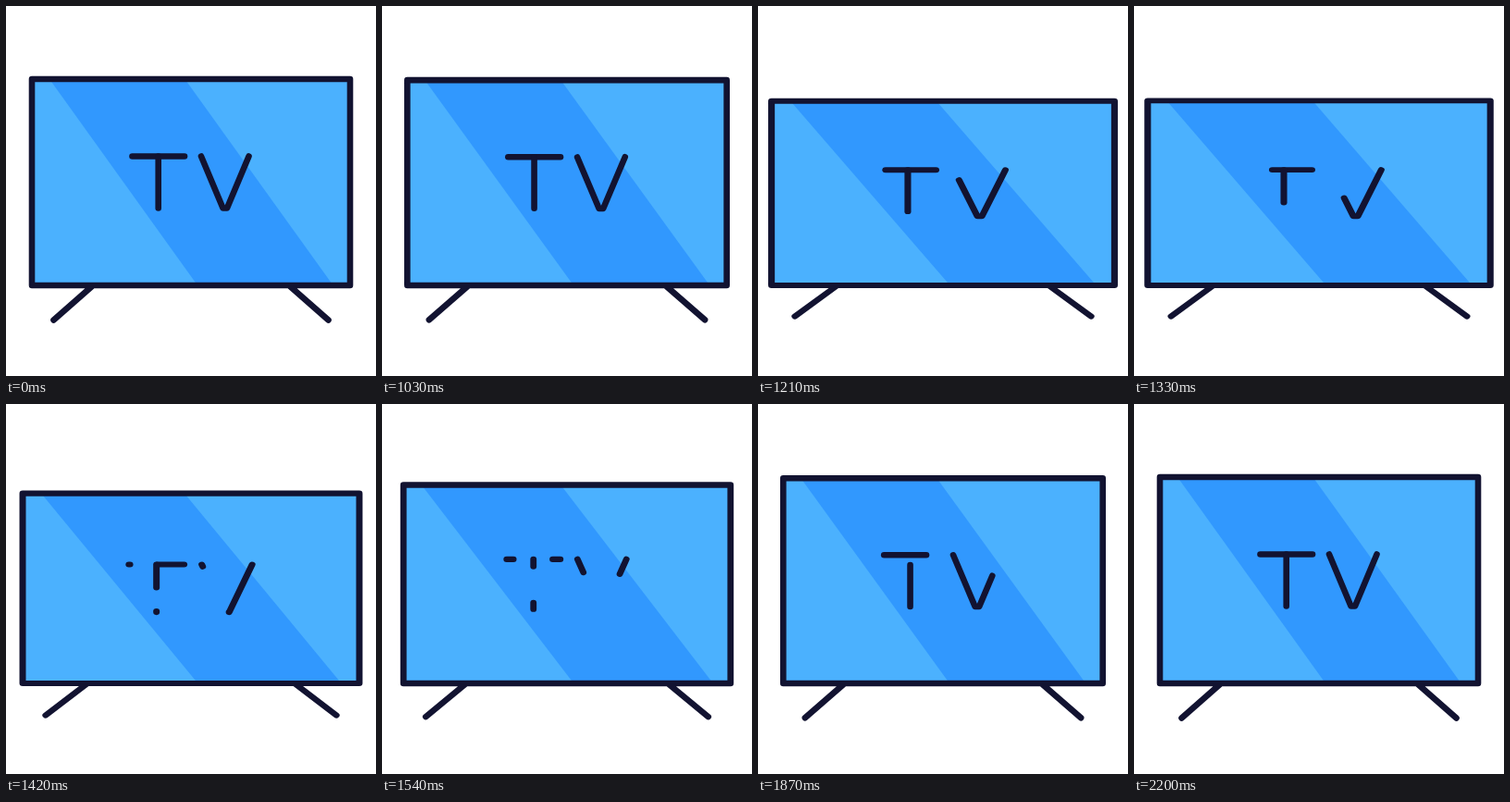
An HTML page for the animation above (2230 ms loop, 400 by 400 pixels).

```html
<!DOCTYPE html>
<html lang="en">
<head>
<meta charset="utf-8">
<title>TV</title>
<style>
  html, body { margin: 0; height: 100%; overflow: hidden; background: #fff; }
  svg { display: block; width: 100%; height: 100%; }
</style>
</head>
<body>
<svg viewBox="0 0 400 400">
  <g id="tv" fill="none" stroke="#121331" stroke-width="6.6" stroke-linecap="round" stroke-linejoin="round">
    <path d="M28 79H372V302H28Z" fill="#4bb1fe" stroke="none"/>
    <path d="M47 79H193.4L353.6 302H207Z" fill="#3198fe" stroke="none"/>
    <path d="M28 79H372V302H28ZM93 303L51.5 339.5M307 303L348.5 339.5"/>
    <g id="letters">
      <path pathLength="1" d="M136.5 162.5H193"/>
      <path pathLength="1" d="M164.7 218.5V162.5"/>
      <path pathLength="1" d="M211 162.5L234.5 218.5H239L262.5 162.5"/>
    </g>
  </g>
</svg>
<script>
const LOOP = 2230, START = 1030, STEP = 30;
const tv = document.getElementById('tv');
const leaving = document.getElementById('letters');
const entering = tv.appendChild(leaving.cloneNode(true));
entering.removeAttribute('id');

// Cubic Bezier easing (x1, 0, x2, 1) between two times
function ease(t, from, to, x1, x2) {
  const x = (t - from) / (to - from);
  if (x <= 0) return 0;
  if (x >= 1) return 1;
  let lo = 0, hi = 1;
  for (let i = 0; i < 24; i++) {
    const u = (lo + hi) / 2, v = 1 - u;
    if (3 * u * v * v * x1 + 3 * u * u * v * x2 + u ** 3 < x) lo = u; else hi = u;
  }
  return lo * lo * (3 - 2 * lo);
}

// Show only the part of each letter stroke between two fractions
function trim(group, from, to) {
  group.style.display = to - from > 1e-4 ? '' : 'none';
  group.setAttribute('stroke-dasharray', `${to - from} 2`);
  group.setAttribute('stroke-dashoffset', -from);
}

function draw(time) {
  const t = time < START ? 0 : START + Math.floor((time - START) / STEP) * STEP;
  const squash = ease(t, 1000, 1240, .33, .54) - ease(t, 1240, 2200, .33, 0);
  tv.setAttribute('transform',
    `translate(200 302) scale(${1 + .08 * squash} ${1 - .109 * squash}) translate(-200 -302)`);
  trim(leaving, ease(t, 1000, 1660, .63, .71), 1);
  trim(entering, 0, ease(t, 1330, 2110, .48, .55));
}

const begin = performance.now();
function tick() {
  draw((performance.now() - begin) % LOOP);
  requestAnimationFrame(tick);
}
tick();
</script>
</body>
</html>
```
